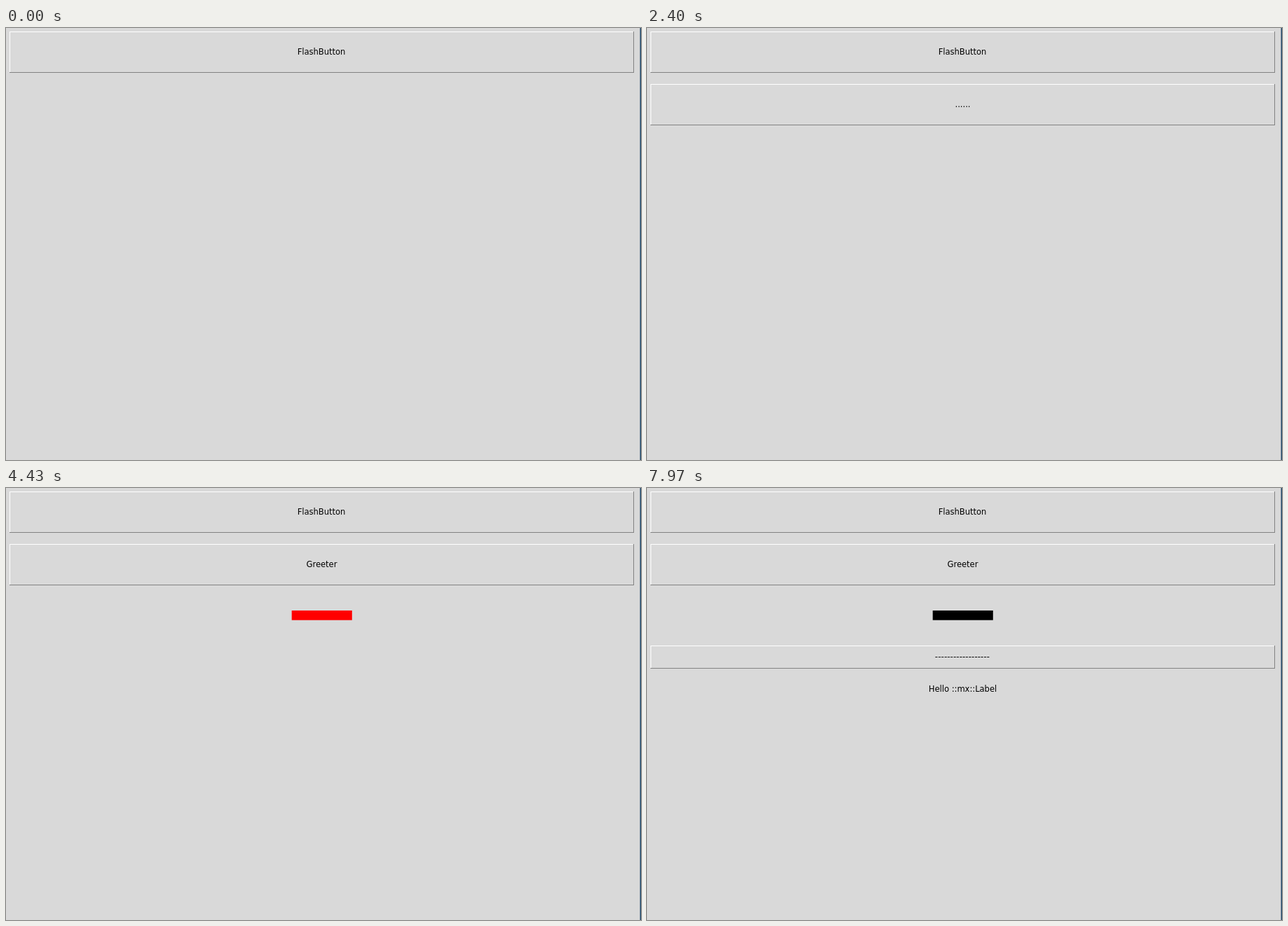
An HTML page that plays this animation: 908x617 px, repeating every 8000 ms.

```html
<!DOCTYPE html>
<html lang="en">
<head>
<meta charset="utf-8">
<title>Widget flash demo</title>
<style>
  html, body { margin: 0; width: 100%; height: 100%; overflow: hidden; background: #d9d9d9; }
  svg { display: block; width: 908px; height: 617px; }
  text { font: 11.5px "DejaVu Sans", sans-serif; text-anchor: middle; fill: #000; }

  .light { fill: #fff; }
  .dark { fill: #828282; }
  .dashes { letter-spacing: .2px; }

  /* every change is a hard cut on one shared 8 s clock */
  .anim { animation: 8s step-end infinite; }
  .flash { animation-name: flash; }
  .greeter { animation-name: show-greeter; }
  .greeter-text { animation-name: swap-greeter; }
  .bar { animation-name: bar; }
  .button { animation-name: show-button; }
  .button-text { animation-name: swap-button; }
  .label { animation-name: show-label; }

  .name { opacity: calc(1 - var(--alt)); }
  .filler { opacity: var(--alt); }

  @keyframes flash {
    0%, 1.1875%, 3.75%, 6.3125%, 8.875%, 12.625%, 100% { fill: #000; }
    .5%, 3.0625%, 5.625%, 8.1875%, 10.75% { fill: #f00; }
  }
  @keyframes show-greeter {
    0% { opacity: 0; }
    12.625%, 100% { opacity: 1; }
  }
  @keyframes swap-greeter {
    0%, 17.625%, 22.625%, 27.5%, 33%, 100% { --alt: 0; }
    15.125%, 20.125%, 25.125%, 30% { --alt: 1; }
  }
  @keyframes bar {
    0% { opacity: 0; fill: #000; }
    33%, 38.125%, 43%, 48%, 52.875%, 57.875%, 100% { opacity: 1; fill: #000; }
    35.5%, 40.625%, 45.5%, 50.5%, 55.375% { opacity: 1; fill: #f00; }
  }
  @keyframes show-button {
    0% { opacity: 0; }
    59.875%, 100% { opacity: 1; }
  }
  @keyframes swap-button {
    0%, 69.75%, 79.625%, 89.625%, 99.625%, 100% { --alt: 1; }
    64.75%, 74.75%, 84.625%, 94.625% { --alt: 0; }
  }
  @keyframes show-label {
    0% { opacity: 0; }
    60.375%, 100% { opacity: 1; }
  }
</style>
</head>
<body>
<svg viewBox="0 0 908 617">
  <defs>
    <g id="tall">
      <path class="light" d="M5 0H898V1H6V59H5Z"/>
      <path class="dark" d="M897 0H898V59H5V58H897Z"/>
    </g>
    <g id="short">
      <path class="light" d="M5 0H898V1H6V33H5Z"/>
      <path class="dark" d="M897 0H898V33H5V32H897Z"/>
    </g>
  </defs>

  <rect width="908" height="617" fill="#d9d9d9"/>
  <rect x="906" width="1" height="617" fill="#8597a6"/>
  <rect x="907" width="1" height="617" fill="#1c4566"/>

  <use href="#tall" y="5"/>
  <text class="anim flash" x="451" y="38">FlashButton</text>

  <g class="anim greeter">
    <use href="#tall" y="80"/>
    <g class="anim greeter-text">
      <text class="name" x="451.5" y="113">Greeter</text>
      <text class="filler" x="451.5" y="113">......</text>
    </g>
  </g>

  <rect class="anim bar" x="408.6" y="175" width="86.2" height="13.7"/>

  <g class="anim button">
    <use href="#short" y="225"/>
    <g class="anim button-text">
      <text class="name" x="451.5" y="245">Hello ::mx::Button</text>
      <text class="filler dashes" x="451" y="245">------------------</text>
    </g>
  </g>

  <text class="anim label" x="451.5" y="291">Hello ::mx::Label</text>
</svg>
</body>
</html>
```
